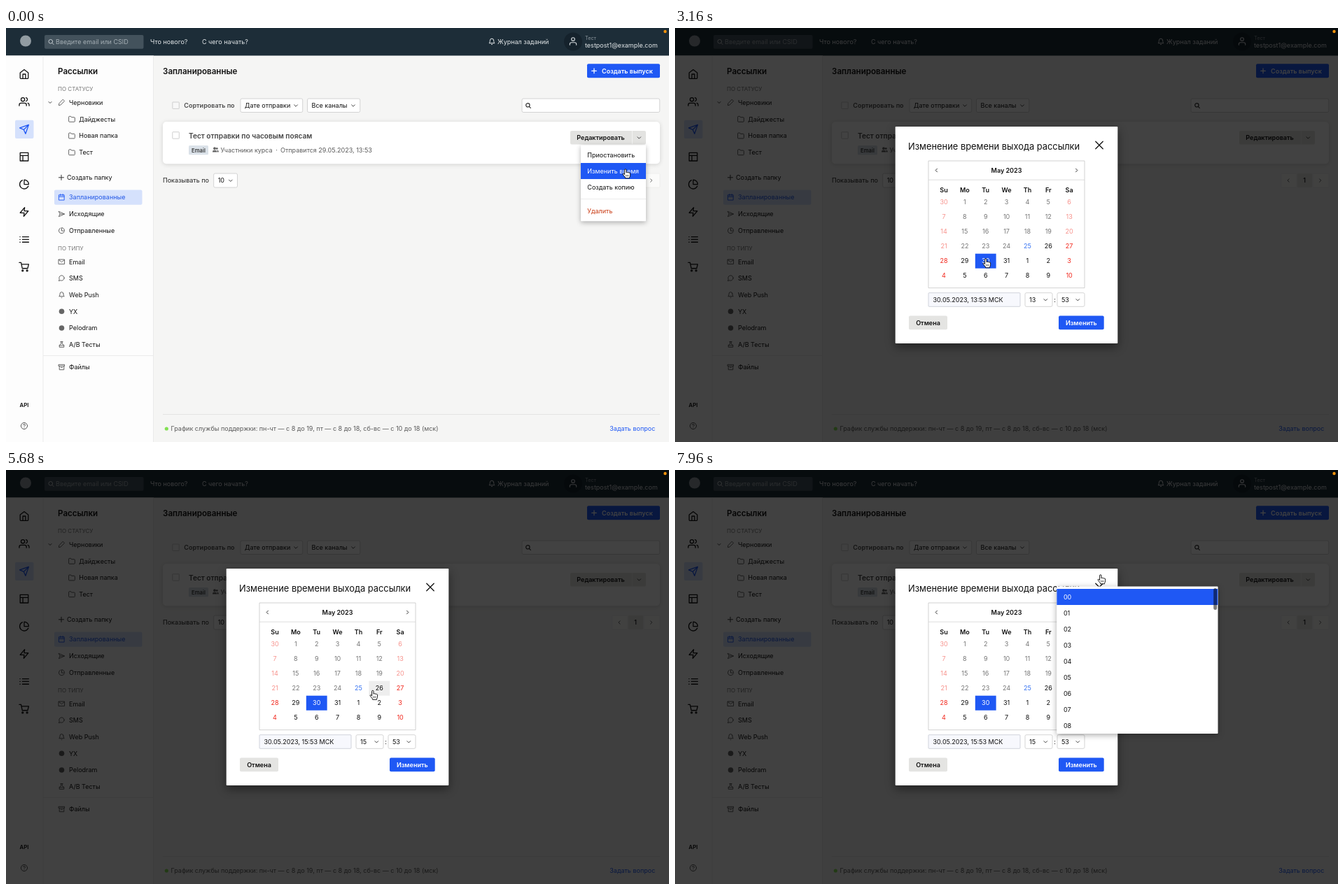
These frames come from a looping animation (947 px wide and 592 px high, 8 s). An HTML page with a canvas:

```html
<!DOCTYPE html>
<html lang="ru">
<head>
<meta charset="utf-8">
<title>Изменение времени выхода рассылки</title>
<style>
html, body { margin: 0; width: 100%; height: 100%; overflow: hidden; }
canvas { display: block; width: 947px; height: 592px; }
</style>
</head>
<body>
<canvas id="stage"></canvas>
<script>
const W = 947, H = 592, LOOP = 8000, STEP = 40;
const BLUE = '#1f58f4', INK = '#111', GREY = '#5b5b5b', ICON = '#555';
const BODY = 9.02;
const canvas = document.getElementById('stage');
const ctx = canvas.getContext('2d');
const dpr = window.devicePixelRatio || 1;
canvas.width = W * dpr;
canvas.height = H * dpr;

// Outline icons on a 24-unit grid
const ICONS = {
  home: 'M3 9l9-7 9 7v11a2 2 0 0 1-2 2H5a2 2 0 0 1-2-2zM9 22V12h6v10',
  users: 'M17 21v-2a4 4 0 0 0-4-4H5a4 4 0 0 0-4 4v2M13 7a4 4 0 1 1-8 0a4 4 0 1 1 8 0M23 21v-2a4 4 0 0 0-3-3.9M16 3.1a4 4 0 0 1 0 7.8',
  user: 'M20 21v-2a4 4 0 0 0-4-4H8a4 4 0 0 0-4 4v2M16 7a4 4 0 1 1-8 0a4 4 0 1 1 8 0',
  send: 'M22 2L11 13M22 2l-7 20-4-9-9-4z',
  layout: 'M3 3h18v18H3zM3 9h18M9 21V9',
  pie: 'M21.2 15.9A10 10 0 1 1 8 2.8M22 12A10 10 0 0 0 12 2v10z',
  zap: 'M13 2L3 14h9l-1 8 10-12h-9z',
  list: 'M8 6h14M8 12h14M8 18h14M2.5 6h.5M2.5 12h.5M2.5 18h.5',
  cart: 'M1 2h4l2.7 13h12L22 6H6M10 20a1.5 1.5 0 1 1-3 0a1.5 1.5 0 1 1 3 0M20 20a1.5 1.5 0 1 1-3 0a1.5 1.5 0 1 1 3 0',
  help: 'M22 12a10 10 0 1 1-20 0a10 10 0 1 1 20 0M9 9a3 3 0 0 1 6 1c0 2-3 3-3 3M12 17v.1',
  bell: 'M18 8A6 6 0 0 0 6 8c0 7-3 9-3 9h18s-3-2-3-9M13.7 21a2 2 0 0 1-3.4 0',
  search: 'M18 10a8 8 0 1 1-16 0a8 8 0 1 1 16 0M16 16l6 6',
  pencil: 'M17 2l5 5L8 21l-6 1 1-6z',
  folder: 'M22 19a2 2 0 0 1-2 2H4a2 2 0 0 1-2-2V5a2 2 0 0 1 2-2h5l2 3h9a2 2 0 0 1 2 2z',
  plus: 'M12 2v20M2 12h20',
  calendar: 'M3 4h18v18H3zM16 1v6M8 1v6M3 10h18',
  dart: 'M2 3l20 9-20 9 4-9zM6 12h15',
  mail: 'M2 4h20v16H2zM2 5l10 8 10-8',
  chat: 'M21 11a9 9 0 0 1-13 8l-6 2 2-6A9 9 0 1 1 21 11z',
  flask: 'M8 2h8M10 2v8L4 14v7h16v-7l-6-4V2M4 15h16',
  box: 'M2 3h20v5H2zM4 8v13h16V8M9 13h6',
  down: 'M4 8l8 8 8-8',
  left: 'M16 4l-8 8 8 8',
  right: 'M8 4l8 8-8 8',
  check: 'M2 13l6 6L22 4',
  cross: 'M2 2l20 20M22 2L2 22'
};
const paths = {};
for (const k in ICONS) paths[k] = new Path2D(ICONS[k]);

const HAND = new Path2D('M-1.4 7.6V1a1.2 1.2 0 0 1 2.4 0V4.7a1.1 1.1 0 0 1 2 .2a1.1 1.1 0 0 1 1.9 .4a1 1 0 0 1 1.7 .8V8.6q0 1.8-1 3v1.2H-.4v-1L-3.6 7.8q-.8-1.3 .3-1.7q.9-.1 1.9 1.5z');
const ARROW = new Path2D('M0 0V10.2L2.4 8L4 11.7L5.7 11L4.1 7.4H7.3Z');

function icon(name, x, y, size, color = ICON, line = 1) {
  const s = size / 24;
  ctx.save();
  ctx.translate(x - size / 2, y - size / 2);
  ctx.scale(s, s);
  ctx.lineWidth = line / s;
  ctx.lineCap = ctx.lineJoin = 'round';
  ctx.strokeStyle = color;
  ctx.stroke(paths[name]);
  ctx.restore();
}

// y is the middle of the capitals
function text(str, x, y, color = INK, weight = 400, size = BODY, align = 'left') {
  ctx.font = `${weight} ${size}px Inter, "Liberation Sans", sans-serif`;
  ctx.textAlign = align;
  ctx.fillStyle = color;
  ctx.fillText(str, x, y + size * 0.364);
}

function rect(x0, y0, x1, y1, fill, radius = 0, border) {
  ctx.beginPath();
  ctx.roundRect(x0, y0, x1 - x0, y1 - y0, radius);
  if (fill) { ctx.fillStyle = fill; ctx.fill(); }
  if (border) { ctx.strokeStyle = border; ctx.lineWidth = 0.8; ctx.stroke(); }
}

function panel(x0, y0, x1, y1, radius, blur, dy, shade) {
  ctx.save();
  ctx.shadowColor = `rgba(0,0,0,${shade})`;
  ctx.shadowBlur = blur * dpr;
  ctx.shadowOffsetY = dy * dpr;
  rect(x0, y0, x1, y1, '#fff', radius);
  ctx.restore();
}

function dot(x, y, r, color) {
  ctx.beginPath();
  ctx.arc(x, y, r, 0, 7);
  ctx.fillStyle = color;
  ctx.fill();
}

function select(x0, y0, x1, y1, label, fill = '#fff') {
  rect(x0, y0, x1, y1, fill, 2, '#c9c9c9');
  text(label, x0 + 6, (y0 + y1) / 2);
  icon('down', x1 - 9.7, (y0 + y1) / 2 + 0.3, 7, '#444');
}

function drawHeader() {
  rect(0, 0, W, 39.5, '#1d2d38');
  dot(28, 18.5, 8, '#929ca2');
  rect(55, 10, 196.5, 29.7, '#43525c', 2);
  icon('search', 64.5, 20, 8.5, '#c3cacf');
  text('Введите email или CSID', 71, 20, '#a5afb5');
  text('Что нового?', 206, 20, '#e3e7e9');
  text('С чего начать?', 280, 20, '#e3e7e9');
  icon('bell', 694, 19.5, 10.5, '#e3e7e9');
  text('Журнал заданий', 702, 20, '#e3e7e9');
  dot(810, 19.5, 13, '#15222c');
  icon('user', 810, 19, 14, '#d5dadd', 1.1);
  text('Тест', 827, 14, '#89949b', 400, 7.3);
  text('testpost1@example.com', 827, 24.3, '#e3e7e9');
}

function drawRail() {
  rect(0, 39.5, 210.5, H, '#fdfdfd');
  rect(52.6, 39.5, 53.4, H, '#e6e6e6');
  rect(210, 39.5, 210.8, H, '#e6e6e6');
  rect(13, 131.8, 39.5, 158, '#d5e1fc', 2);
  ['home', 'users', 'send', 'layout', 'pie', 'zap', 'list', 'cart'].forEach((name, i) =>
    icon(name, 26, 66 + i * 39.4, 15.4, i === 2 ? BLUE : INK, 1.3));
  text('API', 26, 539.5, INK, 600, 7.9, 'center');
  icon('help', 26, 569, 11, ICON);
}

function drawSidebar() {
  text('Рассылки', 74, 61.5, INK, 600, 11.6);
  text('ПО СТАТУСУ', 74, 87, '#777', 400, 8);
  icon('down', 63, 106.5, 6, '#444');
  rect(69, 231.5, 194.5, 252.8, '#d5e1fc', 2);
  const rows = [
    ['pencil', 'Черновики', 106.5], ['calendar', 'Запланированные', 242],
    ['dart', 'Исходящие', 266], ['pie', 'Отправленные', 289.7],
    ['mail', 'Email', 334.3], ['chat', 'SMS', 358], ['bell', 'Web Push', 381.7],
    ['', 'YX', 405.3], ['', 'Pelodram', 429], ['flask', 'A/B Тесты', 452.7],
    ['box', 'Файлы', 485]
  ];
  for (const [name, label, y] of rows) {
    const on = y === 242;
    if (name) icon(name, 79.5, y, 9.8, on ? BLUE : ICON, 0.9);
    else dot(79.5, y, 3.8, '#666');
    text(label, 90, y, on ? '#2157e6' : INK);
  }
  ['Дайджесты', 'Новая папка', 'Тест'].forEach((label, i) => {
    icon('folder', 94, 130.3 + i * 23.7, 10.5, ICON, 0.9);
    text(label, 104.3, 130.3 + i * 23.7);
  });
  icon('plus', 79, 213.8, 8.5, '#333');
  text('Создать папку', 87, 214);
  text('ПО ТИПУ', 74, 314.7, '#777', 400, 8);
  rect(53, 468, 210, 468.8, '#e6e6e6');
}

function drawMain() {
  text('Запланированные', 224, 61.5, INK, 600, 11.6);
  rect(830, 51.3, 934, 71.3, BLUE, 2);
  icon('plus', 840, 61.3, 8, '#fff', 1.2);
  text('Создать выпуск', 851, 61.5, '#fff', 600);

  rect(237.8, 106, 247.3, 115.4, '#f7f7f7', 0.5, '#c4c4c4');
  text('Сортировать по', 254.3, 110.7, '#4d4d4d', 600);
  select(335, 101, 423.7, 120.5, 'Дате отправки');
  select(430.5, 101, 505.7, 120.5, 'Все каналы');
  rect(737, 101, 933.7, 120.5, '#fff', 2, '#c9c9c9');
  icon('search', 746, 111, 8, '#333', 1.2);

  panel(224, 134, 934, 194.3, 5, 6, 1, 0.15);
  rect(237.8, 148.7, 247.3, 158.2, '#fff', 0.5, '#c4c4c4');
  text('Тест отправки по часовым поясам', 261, 154.3, '#444', 600, 10.15);
  rect(261, 168, 289, 181.2, '#dbe2e9', 1.5);
  text('Email', 275, 174.7, '#222', 500, 7.73, 'center');
  dot(298, 172.2, 1.9, '#666');
  rect(295, 174.8, 301, 177.6, '#666', [2, 2, 0, 0]);
  dot(301.3, 172.4, 1.4, '#666');
  rect(301.5, 174.8, 303.6, 177.6, '#666', [0, 1.5, 0, 0]);
  text('Участники курса', 306.5, 174.3, GREY);
  text('·', 385.3, 174.3, GREY);
  text('Отправится 29.05.2023, 13:53', 392, 174.7, GREY);
  rect(806, 147, 914, 166.5, '#e3e3e1', 2);
  rect(894, 147, 894.8, 166.5, '#f6f6f5');
  text('Редактировать', 815.3, 156.8, INK, 600);
  icon('down', 904.3, 157, 7, '#444');

  text('Показывать по', 224, 218, '#222');
  select(296.7, 208, 330.5, 228, '10');
  rect(866, 208, 888, 228, '#fbfbfa', 1, '#ececea');
  rect(889, 208, 910, 228, '#e3e3e1', 1);
  rect(911, 208, 934, 228, '#fbfbfa', 1, '#ececea');
  icon('left', 876, 218, 6.5, '#666');
  icon('right', 921.7, 218, 6.5, '#666');
  text('1', 899, 218, INK, 500, BODY, 'center');

  rect(224, 552, 934, 552.8, '#deded c'.replace(' ', ''));
  dot(229.3, 573, 2.6, '#82e052');
  text('График службы поддержки: пн-чт — с 8 до 19, пт — с 8 до 18, сб-вс — с 10 до 18 (мск)', 235.5, 573, GREY);
  text('Задать вопрос', 862.3, 573, BLUE);
}

function drawMenu() {
  panel(821, 167.5, 914, 276.3, 1, 7, 2, 0.3);
  rect(821, 193, 914, 216, BLUE);
  text('Приостановить', 830.3, 181.5);
  text('Изменить время', 830.3, 204.5, '#fff');
  text('Создать копию', 830.3, 227.5);
  rect(821, 244, 914, 244.8, '#e6e6e6');
  text('Удалить', 830.3, 261.7, '#c8370f');
}

const COL = 29.85, ROW = 21, LEFT = 369.1, TOP = 238.7;

function cellAt(x, y) {
  const c = Math.floor((x - LEFT) / COL), r = Math.floor((y - TOP) / ROW);
  const i = r * 7 + c;
  return c >= 0 && c < 7 && r >= 0 && r < 6 && i >= 25 ? i : -1;
}

function selectAt(x, y) {
  if (y < 378.5 || y > 398.5) return -1;
  return x > 500 && x < 539 ? 0 : x > 546 && x < 585 ? 1 : -1;
}

function drawModal(s) {
  panel(314.7, 141, 632.3, 451, 1, 14, 5, 0.45);
  text('Изменение времени выхода рассылки', 333, 169.3, INK, 400, 12.88);
  icon('cross', 606, 167.5, 12.5, INK, 1.3);

  rect(362, 190, 585, 371.7, null, 0, '#c6c6c6');
  rect(362, 216.7, 585, 217.4, '#d2d2d2');
  icon('left', 373.3, 203.5, 7, '#333');
  icon('right', 573.7, 203.5, 7, '#333');
  text('May 2023', 473.5, 203.7, INK, 600, BODY, 'center');
  const mid = c => LEFT + COL * (c + 0.5);
  ['Su', 'Mo', 'Tu', 'We', 'Th', 'Fr', 'Sa'].forEach((d, c) =>
    text(d, mid(c), 231.3, INK, 600, BODY, 'center'));
  for (let i = 0; i < 42; i++) {
    const c = i % 7, x = LEFT + c * COL, y = TOP + Math.floor(i / 7) * ROW;
    const weekend = c === 0 || c === 6;
    let color = weekend ? '#f2271c' : INK;
    if (i < 25) color = weekend ? '#f7938d' : '#777';
    if (i === 25) color = '#3b76f2';
    if (i === s.day) { rect(x, y, x + COL, y + ROW, BLUE); color = '#fff'; }
    else if (i === s.hoverDay) rect(x, y, x + COL, y + ROW, '#eeeeee');
    const n = i === 0 ? 30 : i > 31 ? i - 31 : i;
    text(n, mid(c), y + ROW / 2, color, 400, BODY, 'center');
  }

  rect(362, 378.7, 493, 398.3, '#f7f8fd', 1, '#c6c8d2');
  text(`${s.day}.05.2023, ${s.hour}:53 МСК`, 368.5, 388.7);
  const tone = k => s.hoverSelect === k ? '#e4e4e4' : '#fff';
  select(500, 378.7, 539, 398.3, s.hour, tone(0));
  text(':', 542.5, 388.5, INK, 400, BODY, 'center');
  select(546, 378.7, 585, 398.3, '53', tone(1));
  rect(334, 411.5, 389, 431.2, '#e4e4e2', 2);
  text('Отмена', 361.5, 421.5, INK, 600, BODY, 'center');
  rect(548, 411.5, 612.7, 431.2, BLUE, 2);
  text('Изменить', 580.3, 421.5, '#fff', 600, BODY, 'center');
}

function drawList({ x, count, chosen, scroll, bar }, y) {
  const y0 = 166.5, y1 = 377, x1 = x + 230.3, pitch = 23, first = 170;
  panel(x, y0, x1, y1, 1, 8, 2, 0.35);
  ctx.save();
  ctx.beginPath();
  ctx.rect(x, y0, x1 - x, y1 - y0);
  ctx.clip();
  const hot = y > y1 ? chosen : Math.max(0, Math.floor((y - first + scroll) / pitch));
  for (let n = 0; n < count; n++) {
    const top = first + n * pitch - scroll;
    if (top > y1 || top < y0 - pitch) continue;
    const color = n === hot ? '#fff' : INK;
    if (n === hot) rect(x, top, x1, top + pitch, BLUE);
    if (n === chosen) icon('check', x + 16.5, top + 11.5, 7, n === hot ? '#fff' : '#333');
    text(String(n).padStart(2, '0'), x + (n === chosen ? 26 : 9.7), top + 11.5, color);
  }
  const view = y1 - y0, total = count * pitch + 7;
  const len = 205 * view / total;
  const by = 169 + (207 - len) * scroll / (total - view);
  ctx.globalAlpha = bar;
  rect(x1 - 6.3, by, x1 - 1.4, by + len, 'rgba(0,0,0,.52)', 2.4);
  ctx.restore();
}

const clamp = v => Math.min(1, Math.max(0, v));
const smooth = u => u * u * (3 - 2 * u);

// Pointer tip: time, x, y
const MOVES = [
  [720, 885, 202], [1440, 481, 393], [1600, 481, 393], [1800, 459, 389],
  [2240, 459, 389], [2480, 436, 325.5], [2600, 436, 325.5], [2720, 441, 327.5],
  [3120, 441, 327.5], [3160, 444, 330], [3640, 532, 391.5],
  [4240, 532, 391.5], [4280, 531, 386.5], [4520, 526, 296],
  [5000, 526, 296], [5440, 524, 315.5], [5920, 524, 315.5], [6440, 564, 391],
  [6680, 564, 391], [6920, 624, 205.5], [7000, 624, 205.5], [7480, 622, 221],
  [7560, 622, 221], [7960, 608, 150]
];

function pointer(t) {
  if (t <= MOVES[0][0]) return MOVES[0].slice(1);
  const k = MOVES.findIndex(m => m[0] >= t);
  if (k < 0) return MOVES[MOVES.length - 1].slice(1);
  const [t0, x0, y0] = MOVES[k - 1], [t1, x1, y1] = MOVES[k];
  const u = smooth((t - t0) / (t1 - t0));
  return [x0 + (x1 - x0) * u, y0 + (y1 - y0) * u];
}

function openList(t) {
  if (t >= 3800 && t < 5680)
    return { x: 499.2, count: 24, chosen: 13, scroll: 208.5, bar: 1 - clamp((t - 4280) / 240) };
  if (t >= 6520)
    return { x: 545.2, count: 60, chosen: 53, scroll: 1128.5 * (1 - smooth(clamp((t - 7000) / 480))), bar: 1 };
  return null;
}

function drawPointer(x, y, hand) {
  ctx.save();
  ctx.translate(x, y);
  ctx.lineJoin = 'round';
  ctx.lineWidth = hand ? 0.9 : 1.4;
  ctx.strokeStyle = hand ? '#000' : '#fff';
  ctx.fillStyle = hand ? '#fff' : '#000';
  if (!hand) ctx.stroke(ARROW);
  ctx.fill(hand ? HAND : ARROW);
  if (hand) {
    ctx.stroke(HAND);
    ctx.beginPath();
    for (const dx of [0.6, 2.3, 4]) { ctx.moveTo(dx, 8); ctx.lineTo(dx, 10.4); }
    ctx.lineWidth = 0.6;
    ctx.stroke();
  }
  ctx.restore();
}

function draw(t) {
  ctx.setTransform(dpr, 0, 0, dpr, 0, 0);
  ctx.globalAlpha = 1;
  rect(0, 0, W, H, '#f5f5f4');
  drawHeader();
  drawRail();
  drawSidebar();
  drawMain();
  const [x, y] = pointer(t), list = openList(t);
  const hoverDay = t < 720 || list ? -1 : cellAt(x, y), hoverSelect = selectAt(x, y);
  if (t < 80) drawMenu();
  else {
    const shown = t < 120 ? 0.5 : 1;
    ctx.globalAlpha = shown;
    rect(0, 0, W, H, 'rgba(0,0,0,.74)');
    drawModal({ day: t < 2920 ? 29 : 30, hour: t < 5680 ? '13' : '15', hoverDay, hoverSelect });
    ctx.globalAlpha = 1;
  }
  if (list) drawList(list, y);
  dot(941.5, 5, 2.2, '#f2920c');
  drawPointer(x, y, t < 760 || !!list || hoverDay >= 0 || hoverSelect >= 0);
}

const start = performance.now();
let last = -1;
function tick() {
  const t = Math.floor((performance.now() - start) % LOOP / STEP) * STEP;
  if (t !== last) draw(last = t);
  requestAnimationFrame(tick);
}
tick();
</script>
</body>
</html>
```
